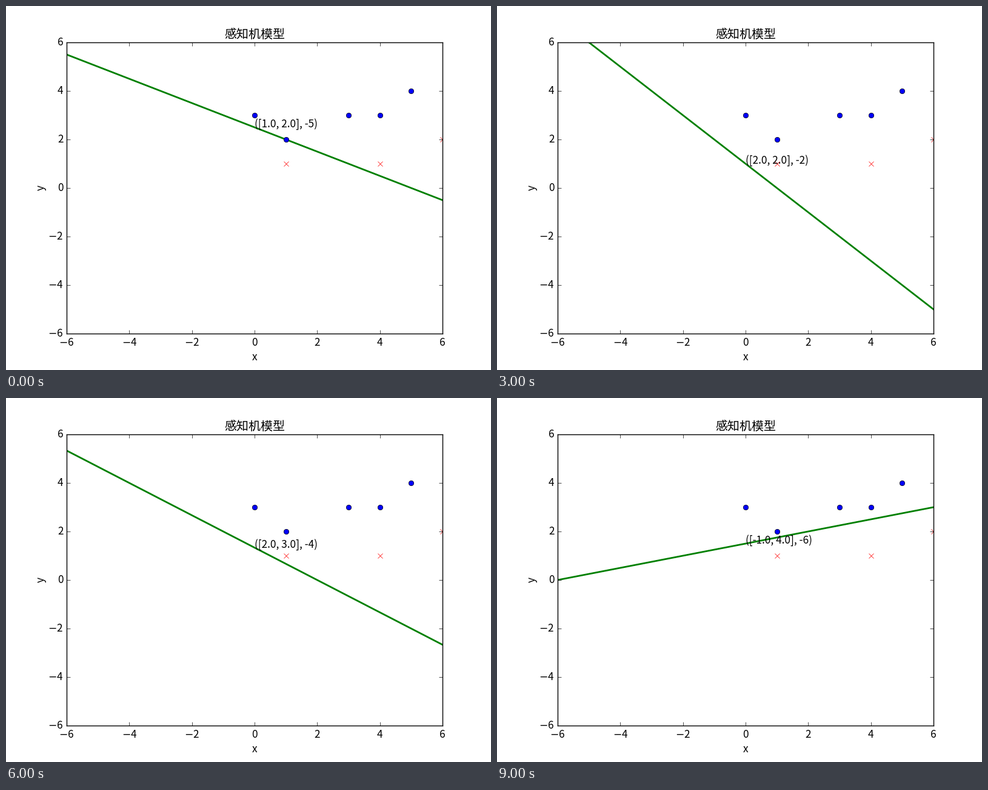
Animation, 800 px wide and 600 px high, one loop 9500 ms. Source, as a matplotlib script:

```python
import matplotlib.pyplot as plt
from matplotlib.animation import FuncAnimation

plt.rcParams.update({
    "font.family": "Noto Sans CJK JP",
    "font.size": 12.4,
    "axes.linewidth": 1.0,
    "lines.linewidth": 2.0,
    "lines.markersize": 6,
    "lines.markeredgewidth": 0.5,
})

WIDTH, HEIGHT, DPI = 800, 600, 100
LIMIT = 6
TICKS = range(-LIMIT, LIMIT + 1, 2)

POSITIVE = [(3, 3), (4, 3), (1, 2), (0, 3), (5, 4)]
NEGATIVE = [(1, 1), (4, 1), (6, 2)]
SAMPLES = [(p, 1) for p in POSITIVE] + [(p, -1) for p in NEGATIVE]


def train():
    """Perceptron states, each correcting the first misclassified sample."""
    w, b = [0.0, 0.0], 0
    states = [([1.0, 2.0], -5)]
    while True:
        for (x, y), label in SAMPLES:
            if label * (w[0] * x + w[1] * y + b) <= 0:
                w = [w[0] + label * x, w[1] + label * y]
                b += label
                break
        else:
            return states
        # Without a slope there is no line: keep the previous picture.
        states.append((w, b) if w[1] else states[-1])


def label_at(x, y, text, **style):
    """Text on a baseline given in stage pixels from the top left."""
    style = {"ha": "center", "va": "baseline", **style}
    return fig.text(x / WIDTH, 1 - y / HEIGHT, text, **style)


def tick_text(value):
    return f"$-${-value}" if value < 0 else str(value)


fig = plt.figure(figsize=(WIDTH / DPI, HEIGHT / DPI), dpi=DPI, facecolor="white")
ax = fig.add_axes([0.125, 0.1, 0.775, 0.8])
ax.set(xlim=(-LIMIT, LIMIT), ylim=(-LIMIT, LIMIT), xticks=TICKS, yticks=TICKS)
ax.set_axisbelow(False)
ax.tick_params(direction="in", length=4, width=0.5, top=True, right=True,
               labelbottom=False, labelleft=False)

for value in TICKS:
    label_at(410 + value * 620 / 12, 560, tick_text(value))
    label_at(94.5, 305 - value * 40, tick_text(value), ha="right")
label_at(410, 53, "感知机模型", fontsize=14.4)
label_at(410, 584, "x")
label_at(61, 300, "y", rotation=90, ha="right", va="center").set(
    ha="center", va="center", x=57.5 / WIDTH)

line, = ax.plot([], [], color="#008000")
ax.plot(*zip(*POSITIVE), "o", color="#0000ff", markeredgecolor="black")
ax.plot(*zip(*NEGATIVE), "x", color="#ff0000")
note = ax.text(0, 0, "", va="baseline")

STATES = train()


def draw(frame):
    w, b = STATES[frame]
    xs = [-7, 7]
    line.set_data(xs, [-(b + w[0] * x) / w[1] for x in xs])
    note.set_position((0, -b / w[1]))
    note.set_text(str((w, b)))
    return line, note


anim = FuncAnimation(fig, draw, frames=len(STATES), interval=500,
                     repeat=True, repeat_delay=0)
plt.show()
```
